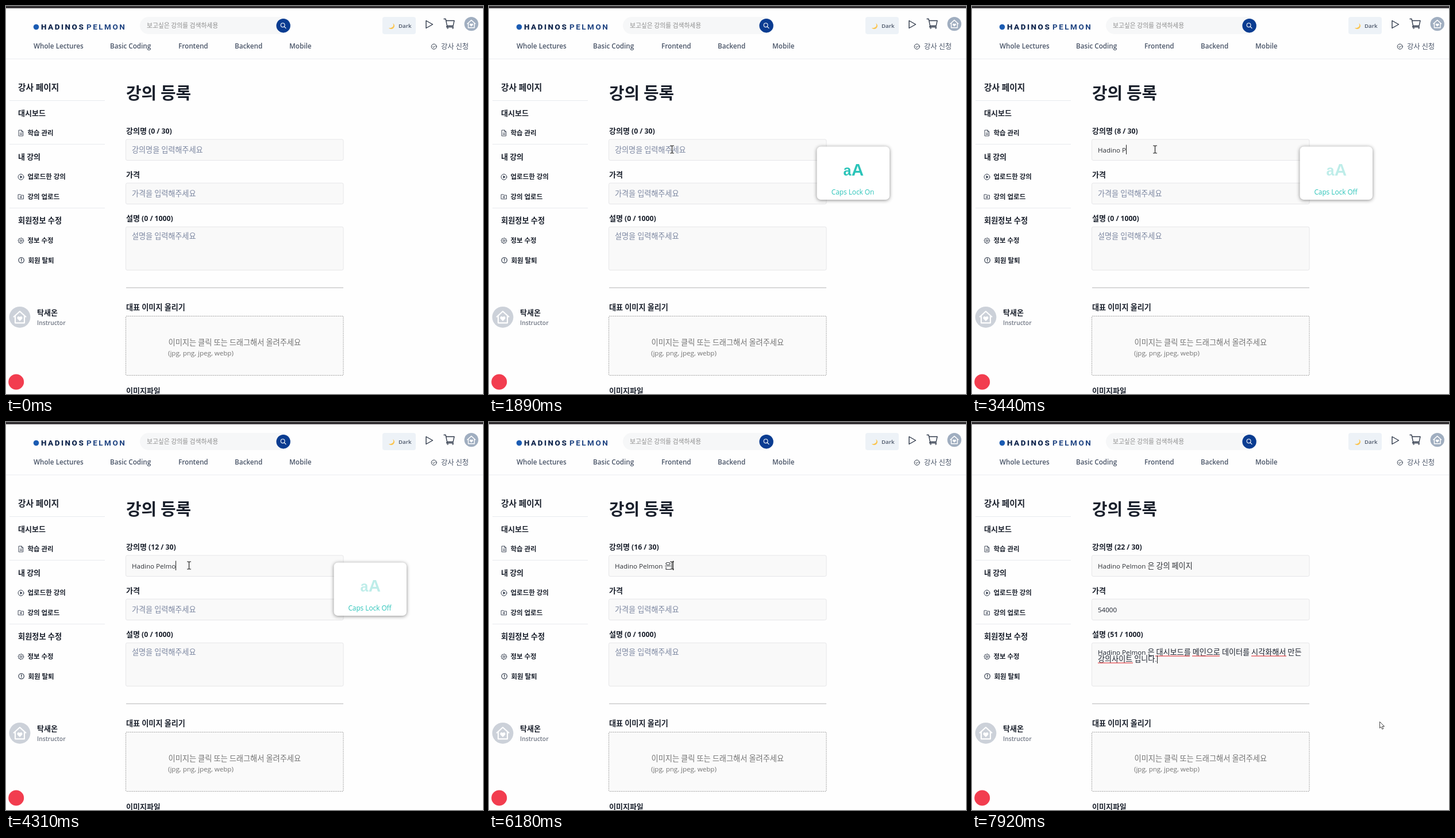
Animation, 830 px wide and 675 px high, one loop 8000 ms. Source, as an HTML page:

```html
<!DOCTYPE html>
<html lang="ko">
<head>
<meta charset="utf-8">
<title>강의 등록</title>
<style>
  html, body { margin: 0; width: 100%; height: 100%; overflow: hidden; background: #fefefe; }
  svg { display: block; width: 830px; height: 675px; }
  text { white-space: pre; font-family: 'Open Sans', 'Noto Sans', 'Noto Sans CJK KR', 'Noto Sans CJK', sans-serif; }
  .logo { font: 900 13.5px Roboto, sans-serif; letter-spacing: 2.5px; }
  .caps { font-family: 'Liberation Sans', sans-serif; font-weight: 700; }
  .line { fill: none; stroke: #2d3748; stroke-linecap: round; stroke-linejoin: round; }
</style>
</head>
<body>
<svg id="stage" viewBox="0 0 830 675" xmlns="http://www.w3.org/2000/svg"></svg>
<script>
const LOOP = 8000;
const INK = '#1a202c', SLATE = '#4a5568', HINT = '#7b86a0', TEAL = '#2bc4b9';
const TEXT = 13.1, LEFT = 219;

// Latin runs are set slightly smaller than the Hangul beside them.
function runs(str, size, weight) {
  const latin = size * (weight >= 600 ? 0.94 : 0.885);
  return (str.match(/[ㄱ-힣]+|[^ㄱ-힣]+/g) || [])
    .map(run => `<tspan font-size="${/[ㄱ-힣]/.test(run) ? size : latin.toFixed(2)}">${run}</tspan>`).join('');
}
const mixed = (x, y, str, size, fill = INK, weight = 400, id = '') =>
  `<text id="${id}" x="${x}" y="${y}" fill="${fill}" font-weight="${weight}">${runs(str, size, weight)}</text>`;
const bold = (x, y, str, size = 13, id = '') => mixed(x, y, str, size, INK, 700, id);
const latin = (x, y, str, size, fill = SLATE, weight = 600, extra = '') =>
  `<text x="${x}" y="${y}" font-size="${size}" fill="${fill}" font-weight="${weight}" ${extra}>${str}</text>`;
const rect = (x, y, w, h, fill, rx = 0, extra = '') =>
  `<rect x="${x}" y="${y}" width="${w}" height="${h}" fill="${fill}" rx="${rx}" ${extra}/>`;
const line = (d, width = 1, extra = '') => `<path class="line" d="${d}" stroke-width="${width}" ${extra}/>`;
const circle = (x, y, r, fill) => `<circle cx="${x}" cy="${y}" r="${r}" fill="${fill}"/>`;
const ring = (x, y, r, w = 1) => `<circle class="line" cx="${x}" cy="${y}" r="${r}" stroke-width="${w}"/>`;
const field = (y, h) => rect(208.5, y, 378.5, h, '#f9f9f9', 2.5, 'stroke="#e6e6e8"');

const avatar = (x, y, scale, fill) => `<g transform="translate(${x} ${y}) scale(${scale})">
  ${circle(0, 0, 18.4, fill)}
  <path d="M-11 0L0-10L11 0M-8-2V10H8V-2" fill="none" stroke="#fff" stroke-width="2.2" stroke-linejoin="round"/>
  <path d="M0 7L-4 3C-6 0-2-3 0 0C2-3 6 0 4 3Z" fill="#fff"/></g>`;

function header() {
  const nav = [[48, 'Whole Lectures'], [181, 'Basic Coding'], [300, 'Frontend'], [398, 'Backend'], [493, 'Mobile']];
  return rect(0, 0, 830, 4, '#353235') + rect(0, 91.5, 830, 1, '#eceef1')
    + circle(52.5, 36.5, 4.8, '#1b5cb3')
    + '<text class="logo" x="61" y="41" fill="#12284f">HADINOS</text>'
    + '<text class="logo" x="140" y="41" fill="#1f4482" style="font-weight:700">PELMON</text>'
    + rect(233, 19, 262, 30, '#f6f7f8', 15)
    + mixed(245, 38.2, '보고싶은 강의를 검색하세용', 10.8, '#8d8d8d')
    + circle(482.6, 34.2, 12.2, '#0a3c91')
    + line('M484.2 35.8L487 38.6', 1.2, 'style="stroke:#fff"')
    + '<circle cx="481.6" cy="33.2" r="3.4" fill="none" stroke="#fff" stroke-width="1.1"/>'
    + nav.map(([x, name]) => latin(x, 74, name, 11.7)).join('')
    + rect(655, 19, 58, 30, '#edf2f7', 4)
    + '<path d="M673 30C676 34 673 39 666 38C670 43 678 38 675.5 32.5Q675 31 673 30Z" fill="#fbc550"/>'
    + latin(683, 37.6, 'Dark', 9.7)
    + line('M731 25.5V38.5L742.5 32Z', 1.4)
    + line('M762 22.5H765L767.5 34.5H778L780 25.5H766M767.5 34.5L766.5 36.5H778.5', 1.3)
    + ring(768.5, 38.5, 1) + ring(777.5, 38.5, 1)
    + avatar(809.7, 31.2, 0.66, '#a0aec0')
    + ring(744.7, 70.6, 4.5) + line('M742.6 70.7L744.2 72.2L747 69.3')
    + mixed(757, 75, '강사 신청', 12.3, SLATE);
}

function sidebar() {
  const gear = Array.from({ length: 32 }, (_, i) => {
    const r = i % 4 < 2 ? 4.9 : 3.8, a = i * Math.PI / 16;
    return `${(26 + r * Math.cos(a)).toFixed(1)} ${(408.3 + r * Math.sin(a)).toFixed(1)}`;
  }).join('L');
  return bold(21, 147, '강사 페이지', 14.7)
    + [164, 240, 351].map(y => rect(6, y, 166, 1, '#e8eaee')).join('')
    + bold(21, 190.7, '대시보드') + bold(37.5, 224.8, '학습 관리', 11.5)
    + bold(21, 267.2, '내 강의') + bold(37.5, 301.4, '업로드한 강의', 11.5) + bold(37.5, 335.5, '강의 업로드', 11.5)
    + bold(21, 378.4, '회원정보 수정', 13.2) + bold(37.5, 412.4, '정보 수정', 11.5) + bold(38.5, 446.8, '회원 탈퇴', 11.5)
    + line('M22.5 216H27L29.7 218.7V226H22.5ZM27 216V218.7H29.7M24.3 221.2H28M24.3 223.5H28', 0.9)
    + ring(26, 297.4, 4.9) + '<path d="M24.6 294.8V300L28.8 297.4Z" fill="#2d3748"/>'
    + line('M21.5 328H25L26 329.2H30.5V335.7H21.5ZM24.2 332.4H27.8M26 330.6V334.2', 0.9)
    + line(`M${gear}Z`, 1) + ring(26, 408.3, 1.6)
    + ring(26.7, 442.3, 4.7, 1.2) + line('M26.7 439.7V442.8M26.7 444.7V444.8', 1.3)
    + avatar(24, 541.3, 1, '#ccd1d9')
    + bold(54, 538.4, '탁새온') + latin(54, 554.6, 'Instructor', 10.3, '#707784')
    + circle(17.7, 654, 13.5, '#f23d4f');
}

function form() {
  return bold(209, 161.6, '강의 등록', 28.8)
    + bold(209, 221.6, '', 13, 'nameLabel') + field(232, 36.5)
    + mixed(LEFT, 254.8, '강의명을 입력해주세요', TEXT, HINT, 400, 'nameHint')
    + mixed(LEFT, 255, '', TEXT, '#2d3035', 400, 'nameText')
    + bold(209, 297.8, '가격') + field(308, 36.5)
    + mixed(LEFT, 331, '', TEXT, INK, 400, 'priceText')
    + bold(209, 374.2, '', 13, 'aboutLabel') + field(384.2, 75.3)
    + mixed(LEFT, 405, '', TEXT, INK, 400, 'aboutText')
    + `<g id="aboutMore">${mixed(LEFT, 417, '강의사이트 입니다.', TEXT)}
       <path d="M319 407.2H379M383 407.2H431M486 407.2H547M219 419.2H280" stroke="#e5484d" stroke-width="1.2"/></g>`
    + rect(209, 489.6, 378, 1, '#b3b3b5')
    + bold(209, 528.8, '대표 이미지 올리기', 13.1)
    + rect(208.5, 539.5, 378.5, 103, '#fafafa', 1, 'stroke="#a3a3a3" stroke-dasharray="2 1.2"')
    + mixed(282.5, 589.6, '이미지는 클릭 또는 드래그해서 올려주세요', 13.2, '#747474')
    + mixed(282, 608, '(jpg, png, jpeg, webp)', 13.1, '#747474')
    + bold(209, 674.4, '이미지파일');
}

const overlay = () => `<g id="popup">
    ${rect(570.5, 244.5, 126.5, 92.5, '#fff', 7, 'style="filter:drop-shadow(0 1px 3px #0007)"')}
    <g id="capsMark" fill="${TEAL}"><text class="caps" x="616.5" y="295" font-size="25">a</text>
    <text class="caps" x="630.8" y="295" font-size="29.5">A</text></g>
    ${latin(633, 328.4, '', 11.8, TEAL, 400, 'id="capsText" text-anchor="middle"')}</g>
  <rect id="caret" width="1" fill="#222"/>
  <path id="arrow" d="M.5.5V11.5L3 9.3L4.8 13.4L6.8 12.5L5 8.5H8.5Z" fill="#fff" stroke="#333" stroke-width=".9"/>
  <path id="beam" d="M-3.5-6.5H-1L0-5.5L1-6.5H3.5M0-5.5V5.5M-3.5 6.5H-1L0 5.5L1 6.5H3.5"
    fill="none" stroke="#222" stroke-width="1.2"/>`;

document.getElementById('stage').innerHTML = header() + sidebar() + form() + overlay();
const el = id => document.getElementById(id);
const show = (id, on) => el(id).setAttribute('visibility', on ? 'visible' : 'hidden');
const place = (id, x, y) => el(id).setAttribute('transform', `translate(${x} ${y})`);

const BRAND = 'Hadino Pelmon';
const latinTimes = [2150, 2550, 2650, 2750, 2840, 3040, 3300, 3770, 3970, 4170, 4310, 5300];
const typing = [
  [0, ''], [1360, 'h'], [1760, ''], [1970, 'H'],
  ...latinTimes.map((t, i) => [t, BRAND.slice(0, i + 2)]),
  ...[[5430, ' '], [5640, ' ㅇ'], [5780, ' 으'], [6040, ' 은'], [6180, ' 은 '],
    [6240, ' 은 ㄱ'], [6380, ' 은 가'], [6530, ' 은 강'], [6600, ' 은 강ㅇ'], [6660, ' 은 강으'], [6790, ' 은 강의'],
    [6990, ' 은 강의 '], [7120, ' 은 강의 ㅍ'], [7260, ' 은 강의 페'], [7450, ' 은 강의 펭'],
    [7650, ' 은 강의 페이'], [7850, ' 은 강의 페잊'], [7920, ' 은 강의 페이지']].map(([t, s]) => [t, BRAND + s])
];
const capsSteps = [[0, ''], [1820, 'On'], [2080, 'Off'], [3100, 'On'], [3440, 'Off']];
const valueAt = (steps, t) => steps.filter(([from]) => from <= t).pop()[1];
const clamp = v => Math.min(1, Math.max(0, v));

const shown = {};
function write(id, str, size, weight) {
  if (shown[id] === str) return;
  shown[id] = str;
  el(id).innerHTML = runs(str, size, weight);
}

function drawPointer(t, done) {
  const p = clamp((t - 330) / 620), ease = p * p * (3 - 2 * p);
  const x = done ? 709 : 727 - 408.5 * ease, y = done ? 521 : 608 - 358.5 * ease;
  const inside = (top, bottom) => y > top && y < bottom;
  const overField = x > 208 && x < 587 && (inside(232, 269) || inside(308, 345) || inside(384, 460));
  show('arrow', t >= 330 && !overField);
  show('beam', t >= 330 && overField);
  place('arrow', x, y);
  place('beam', x, y);
}

function drawPopup(t) {
  const state = valueAt(capsSteps, t);
  el('popup').setAttribute('opacity', state ? 1 - clamp((t - 5500) / 420) : 0);
  el('capsText').textContent = 'Caps Lock ' + state;
  el('capsMark').setAttribute('opacity', state === 'Off' ? 0.3 : 1);
}

function drawCaret(t, name, done) {
  const blinkOff = t >= 4840 && t < 5300;
  show('caret', (name && !blinkOff) || (t >= 1100 && t < 1360));
  const x = done ? 321.5 : LEFT + (name ? el('nameText').getComputedTextLength() : 0);
  el('caret').setAttribute('x', Math.round(x));
  el('caret').setAttribute('y', done ? 406 : 241.5);
  el('caret').setAttribute('height', done ? 14 : 16.5);
}

function draw(t) {
  const name = valueAt(typing, t), done = t >= 7920;
  write('nameLabel', `강의명 (${name.length} / 30)`, 13, 700);
  write('nameText', name, TEXT, 400);
  show('nameHint', !name);
  write('priceText', done ? '54000' : '가격을 입력해주세요', TEXT, 400);
  write('aboutLabel', `설명 (${done ? 51 : 0} / 1000)`, 13, 700);
  write('aboutText', done ? BRAND + ' 은 대시보드를 메인으로 데이터를 시각화해서 만든' : '설명을 입력해주세요', TEXT, 400);
  for (const id of ['priceText', 'aboutText']) el(id).setAttribute('fill', done ? INK : HINT);
  show('aboutMore', done);
  drawPopup(t);
  drawCaret(t, name, done);
  drawPointer(t, done);
}

const start = performance.now();
function tick() {
  draw((performance.now() - start) % LOOP);
  requestAnimationFrame(tick);
}
tick();
</script>
</body>
</html>
```
